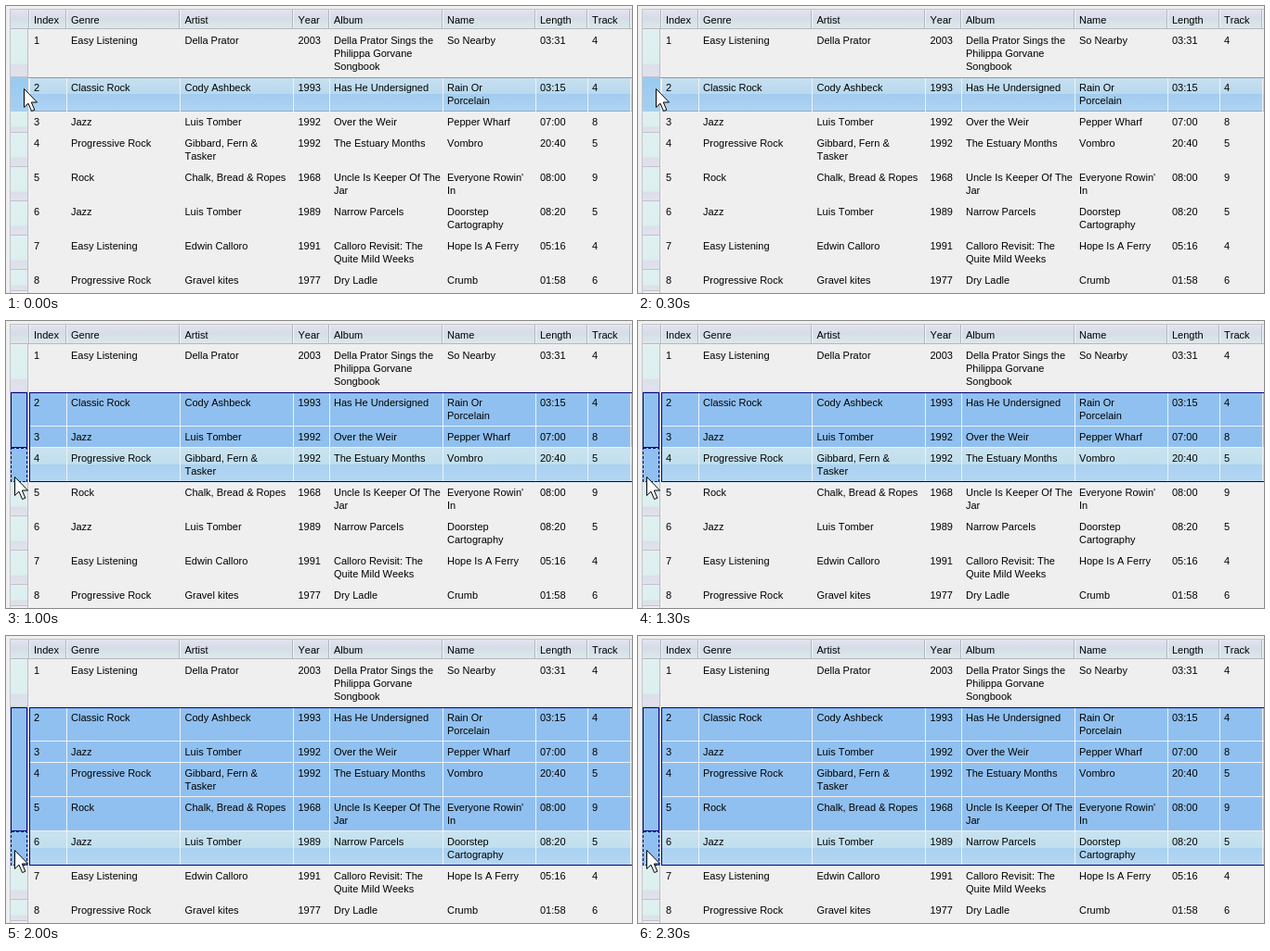
These frames come from a looping animation (674x310 px, 2.5 s). An HTML page:

```html
<!DOCTYPE html>
<html lang="en">
<head>
<meta charset="utf-8">
<title>Row selection</title>
<style>
  html, body { margin: 0; width: 100%; height: 100%; overflow: hidden; background: #efefef; }
  svg { display: block; width: 674px; height: 310px; shape-rendering: crispEdges; }
  text { font: 11px "Liberation Sans", Arial, sans-serif; font-kerning: none; fill: #000; }
  .step { visibility: hidden; animation: show 2500ms step-end infinite; }
  .cursor { shape-rendering: auto; animation: move 2500ms step-end infinite; }
  @keyframes show {
    0% { visibility: visible; }
    20%, 100% { visibility: hidden; }
  }
  @keyframes move {
    0% { transform: translate(19px, 89px); }
    20% { transform: translate(12px, 109px); }
    40% { transform: translate(9px, 168px); }
    60% { transform: translate(9px, 223px); }
    80%, 100% { transform: translate(9px, 231px); }
  }
</style>
</head>
<body>
<svg id="stage" viewBox="0 0 674 310">
  <defs>
    <linearGradient id="head" x2="0" y2="1">
      <stop offset="0" stop-color="#e2e6ee"/>
      <stop offset=".45" stop-color="#d9dbe9"/>
      <stop offset=".5" stop-color="#d2e0e6"/>
      <stop offset="1" stop-color="#dfe8ec"/>
    </linearGradient>
    <linearGradient id="side" x2="0" y2="1">
      <stop offset="0" stop-color="#e0f0f0"/>
      <stop offset=".7" stop-color="#dcefef"/>
      <stop offset=".74" stop-color="#dcdfea"/>
      <stop offset="1" stop-color="#e2e2ec"/>
    </linearGradient>
    <linearGradient id="hover" x2="0" y2="1">
      <stop offset="0" stop-color="#c8e0f0"/>
      <stop offset=".48" stop-color="#b8d9ee"/>
      <stop offset=".5" stop-color="#a2ccf0"/>
      <stop offset="1" stop-color="#b1d4f2"/>
    </linearGradient>
    <linearGradient id="active" x2="0" y2="1">
      <stop offset="0" stop-color="#cae2ee"/>
      <stop offset=".48" stop-color="#c0dfee"/>
      <stop offset=".5" stop-color="#a9d1f1"/>
      <stop offset="1" stop-color="#b5d7f2"/>
    </linearGradient>
    <linearGradient id="sideHover" x2="0" y2="1">
      <stop offset="0" stop-color="#98caf0"/>
      <stop offset="1" stop-color="#a6cff0"/>
    </linearGradient>
  </defs>
</svg>
<script>
const stage = document.getElementById("stage");
const edges = [25, 65, 187, 309, 348, 470, 570, 626, 672];
const textX = [30, 70, 192.5, 314.5, 353, 475, 575, 631];
const outline = "#000080";
const titles = ["Index", "Genre", "Artist", "Year", "Album", "Name", "Length", "Track"];
const rows = [
  ["1", "Easy Listening", "Della Prator", "2003", "Della Prator Sings the|Philippa Gorvane|Songbook", "So Nearby", "03:31", "4"],
  ["2", "Classic Rock", "Cody Ashbeck", "1993", "Has He Undersigned", "Rain Or|Porcelain", "03:15", "4"],
  ["3", "Jazz", "Luis Tomber", "1992", "Over the Weir", "Pepper Wharf", "07:00", "8"],
  ["4", "Progressive Rock", "Gibbard, Fern &|Tasker", "1992", "The Estuary Months", "Vombro", "20:40", "5"],
  ["5", "Rock", "Chalk, Bread & Ropes", "1968", "Uncle Is Keeper Of The|Jar", "Everyone Rowin'|In", "08:00", "9"],
  ["6", "Jazz", "Luis Tomber", "1989", "Narrow Parcels", "Doorstep|Cartography", "08:20", "5"],
  ["7", "Easy Listening", "Edwin Calloro", "1991", "Calloro Revisit: The|Quite Mild Weeks", "Hope Is A Ferry", "05:16", "4"],
  ["8", "Progressive Rock", "Gravel kites", "1977", "Dry Ladle", "Crumb", "01:58", "6"]
];

function add(parent, tag, attrs, content) {
  const el = document.createElementNS("http://www.w3.org/2000/svg", tag);
  for (const key in attrs) el.setAttribute(key, attrs[key]);
  if (content) el.textContent = content;
  parent.append(el);
  return el;
}
const box = (parent, x, y, width, height, fill) => add(parent, "rect", { x, y, width, height, fill });
const label = (x, y, content) => add(stage, "text", { x, y }, content);
const frame = (parent, x, y, w, h, dash = "none") =>
  add(parent, "rect", { x: x + .5, y: y + .5, width: w - 1, height: h - 1, fill: "none", stroke: outline, "stroke-dasharray": dash });

// Row height follows the cell with the most lines.
let nextTop = 26;
const layout = rows.map(cells => {
  const lines = Math.max(...cells.map(c => c.split("|").length));
  const row = { top: nextTop, height: 9 + 14 * lines };
  nextTop += row.height;
  return row;
});

function drawHeader() {
  box(stage, 4, 3, 670, 22, "url(#head)");
  box(stage, 4, 3, 670, 1, "#c3c6cb");
  box(stage, 4, 24, 670, 1, "#b4b9bf");
  for (const x of edges) {
    box(stage, x - 1, 4, 1, 20, "#b2b7bd");
    box(stage, x, 4, 1, 20, "#f2f5f7");
  }
  titles.forEach((title, i) => label(textX[i], 19, title));
}

function drawGutter() {
  for (const { top, height } of layout) {
    box(stage, 5, top, 18, height, "url(#side)");
    box(stage, 5, top + height - 1, 18, 1, "#bfc3cb");
  }
  box(stage, 4, 4, 1, 306, "#c3c6cb");
  box(stage, 23, 25, 1, 285, "#b9bdc3");
}

function fillRow(parent, { top, height }, fill, side, rule) {
  box(parent, 25, top, 649, height, fill);
  box(parent, 5, top, 18, height, side);
  box(parent, 25, top + height - 1, 649, 1, rule);
  for (const x of edges) box(parent, x, top, 1, height, "#ecf2f6");
}

function drawHover(parent, row) {
  fillRow(parent, row, "url(#hover)", "url(#sideHover)", "#8fa9c0");
  box(parent, 24, row.top, 650, 1, "#8f969d");
}

function drawSelection(parent, first, last) {
  const start = layout[first], end = layout[last];
  for (let i = first; i <= last; i++) {
    fillRow(parent, layout[i], i === last ? "url(#active)" : "#90c0f0", "#90c0f0", "#ecf2f6");
  }
  const bottom = end.top + end.height;
  frame(parent, 25, start.top, 660, bottom - start.top);
  if (last > first) frame(parent, 5, start.top, 18, end.top - start.top);
  frame(parent, 5, end.top, 18, end.height, "3 2");
}

drawHeader();
drawGutter();

const steps = [
  g => drawHover(g, layout[1]),
  g => drawSelection(g, 1, 1),
  g => drawSelection(g, 1, 3),
  g => drawSelection(g, 1, 5),
  g => drawSelection(g, 1, 5)
];
steps.forEach((draw, i) => {
  draw(add(stage, "g", { class: "step", style: `animation-delay:${i * 500 - 2500}ms` }));
});

rows.forEach((cells, r) => cells.forEach((cell, c) => {
  cell.split("|").forEach((line, n) => label(textX[c], layout[r].top + 15 + 14 * n, line));
}));

add(stage, "path", {
  class: "cursor",
  d: "M.5 .5V20.5L5 16.2L8.6 24.5L11.8 23.2L8.3 15H14.5Z",
  fill: "#fff", stroke: "#000", "stroke-width": 1
});
</script>
</body>
</html>
```
